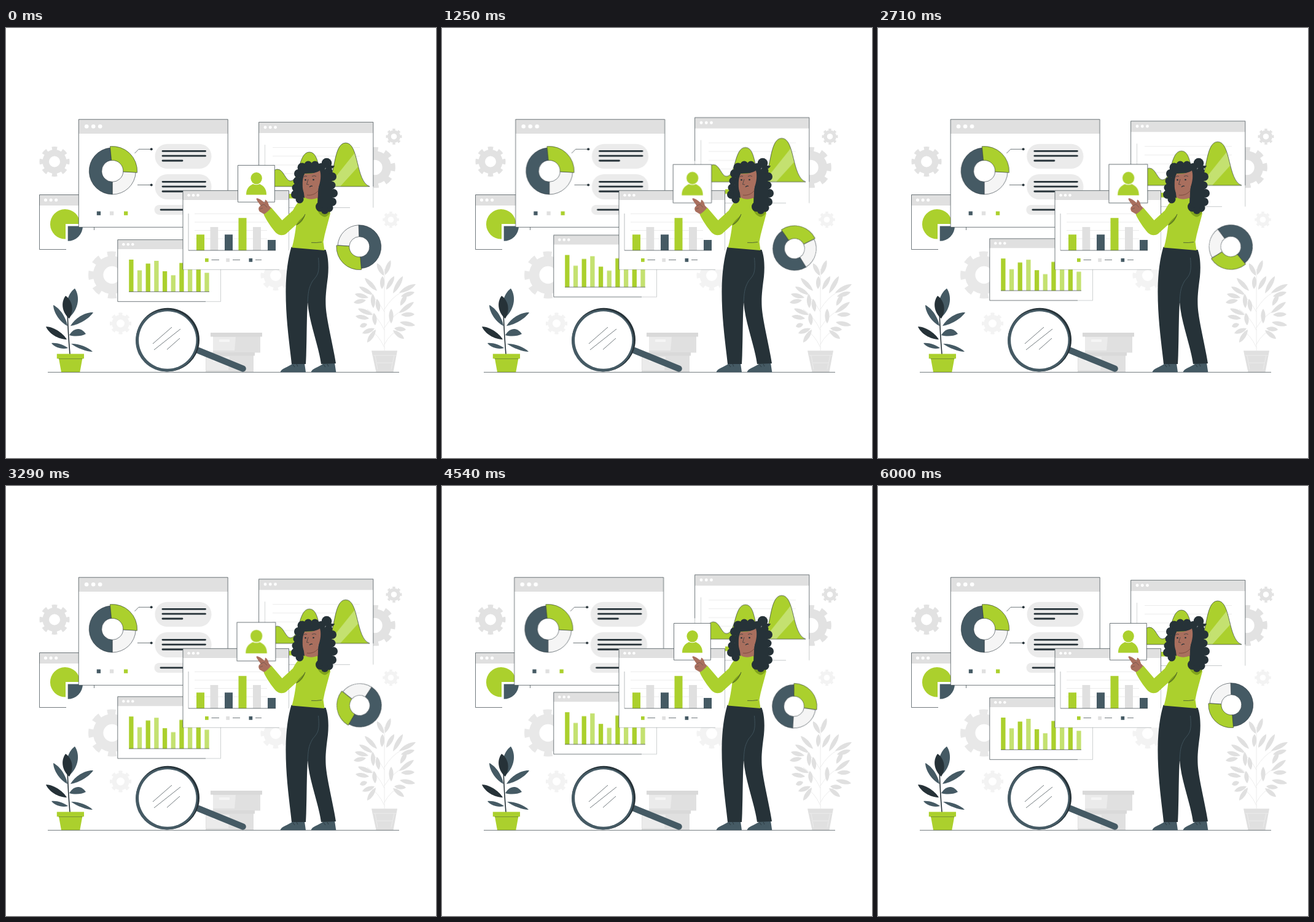
Animation, 700 px wide and 700 px high, one loop 6.04 s. Source, as an HTML page:

```html
<!DOCTYPE html>
<html lang="en">
<head>
<meta charset="utf-8">
<title>Data analysis</title>
<style>
  html, body { margin: 0; width: 100%; height: 100%; overflow: hidden; background: #fff; }
  svg { display: block; width: 100%; height: 100%; }
  .green { fill: #abd02d; } .lime { fill: #c4e170; } .slate { fill: #455a64; }
  .dark { fill: #263238; } .grey { fill: #e0e0e0; } .pale { fill: #ebebeb; }
  .mist { fill: #f5f5f5; } .white { fill: #fff; } .skin { fill: #a96f5e; }
  .line { fill: none; stroke: #263238; stroke-width: .65; }
  .faint { fill: none; stroke: #e8e8e8; stroke-width: .8; }
  .text { fill: none; stroke: #263238; stroke-width: 2.8; stroke-linecap: round; }

  /* six seconds of motion, then a 40 ms hold */
  .shake, .float, .beat, .spin { animation: 6040ms linear -4ms infinite; }
  .shake { animation-name: shake; }
  .float { animation-name: float; animation-timing-function: steps(36); }
  .beat { animation-name: beat; transform-origin: 407.5px 253.5px; }
  .spin { animation-name: spin; animation-timing-function: steps(144); transform-origin: 574.2px 357.5px; }
  @keyframes shake {
    0%, 99.34%, 100% { transform: translateX(0); }
    9.93%, 89.4% { transform: translateX(-1px); }
    19.87%, 79.47% { transform: translateX(2px); }
    29.8%, 49.67%, 69.54% { transform: translateX(-4px); }
    39.74%, 59.6% { transform: translateX(4px); }
  }
  @keyframes float {
    0%, 49.67%, 99.34%, 100% { transform: translateY(0); }
    24.83%, 74.5% { transform: translateY(-9px); }
  }
  @keyframes beat {
    0%, 29.8%, 39.74%, 59.6%, 100% { transform: scale(1); }
    9.93%, 49.67% { transform: scale(1.1); }
  }
  @keyframes spin {
    0% { transform: rotate(0); }
    99.34%, 100% { transform: rotate(720deg); }
  }
</style>
</head>
<body>
<svg viewBox="0 0 700 700">
  <defs>
    <g id="gear" fill="none">
      <circle r="14.3" stroke-width="10.6"/>
      <circle r="21.5" stroke-width="6" pathLength="16" stroke-dasharray="1 1" stroke-dashoffset=".5"/>
    </g>
    <g id="dots" fill="#fff"><circle r="3.3"/><circle cx="11" r="3.3"/><circle cx="22" r="3.3"/></g>
    <path id="hills" d="M424 258C430 236 436 230 442 230C452 230 455 249 463 249C479 249 475 202 494 202C513 202 507 250 521 250C537 250 531 187 553 187C575 187 569 250 592 258Z"/>
    <clipPath id="inHills"><use href="#hills"/></clipPath>
  </defs>

  <g stroke="#e2e2e2">
    <use href="#gear" transform="translate(79 217.5)"/>
    <use href="#gear" transform="translate(631.5 176.7) scale(.53)"/>
    <use href="#gear" transform="translate(600.5 227) scale(1.36)"/>
    <use href="#gear" transform="translate(172.5 402) scale(1.57)" stroke="#e8e8e8"/>
    <g stroke="#f3f3f3">
      <use href="#gear" transform="translate(626.5 312) scale(.54)"/>
      <use href="#gear" transform="translate(186.5 481) scale(.72)"/>
      <use href="#gear" transform="translate(439 403)"/>
    </g>
  </g>

  <!-- storage boxes -->
  <path class="grey" d="M325 533H403V560H325ZM337 502H414V528.5H337Z"/>
  <path fill="#d9d9d9" d="M333 496H417V502.5H333ZM321 528H405V533.5H321Z"/>
  <path class="pale" d="M337 503H374L372 525H337ZM326 535H364L362 557H326Z"/>
  <path class="mist" d="M347 507H364V511H347ZM337 538H354V543H337Z"/>

  <!-- small pie window -->
  <path class="white" d="M54.5 271.5H143.5V360.5H54.5Z"/>
  <path class="grey" d="M54.5 271.5H143.5V289H54.5Z"/>
  <use href="#dots" transform="translate(64.5 280) scale(.78)"/>
  <path class="line" d="M143.5 271.5H54.5V360.5H98M143.5 323V329"/>
  <path class="green" d="M97 319H120.5A24.3 24.3 0 1 0 97 343.5Z"/>
  <path class="slate" d="M100.7 322.5H125A24.3 24.3 0 0 1 100.7 346.8Z"/>

  <!-- bar window -->
  <g class="float">
    <path class="white" d="M181.800 344.700H349.500V445.300H181.800Z"/>
    <path class="grey" d="M181.800 344.700H349.500V360H181.800Z"/>
    <use href="#dots" transform="translate(191.3 352.3) scale(.68)"/>
    <path class="line" d="M349.5 344.7H181.8V445.3H325"/>
    <path class="line" opacity=".35" d="M325 445.3H349.5V345"/>
    <g id="bars"></g>
    <path class="line" d="M200 429.3H331"/>
  </g>

  <!-- area chart window -->
  <g class="float">
    <path class="white" d="M411.6 153.3H597.8V292.5H411.6Z"/>
    <path class="grey" d="M411.6 153.3H597.8V171H411.6Z"/>
    <use href="#dots" transform="translate(422 161.8) scale(.75)"/>
    <path class="line" d="M411.6 224V153.3H597.8V258"/>
    <path class="line" opacity=".4" d="M597.8 258V292.5M411.6 224V292.5H560"/>
    <path class="faint" d="M434 194.5H576M434 208.5H576M434 223H576M434 237H576"/>
    <path class="line" opacity=".3" d="M421.5 190V258"/>
    <use href="#hills" class="green"/>
    <path class="lime" clip-path="url(#inHills)" d="M524 258L568 203L574 225L544 258Z"/>
    <use href="#hills" class="line"/>
    <path class="green" d="M461 270H468V277.5H461Z"/>
  </g>

  <!-- main report window -->
  <g class="shake">
    <path class="white" d="M118.3 148.800H361.200V324.300H118.300Z"/>
    <path class="grey" d="M118.3 148.8H361.2V172H118.3Z"/>
    <use href="#dots" transform="translate(131.2 160.2)"/>
    <path class="line" d="M118.3 148.8H361.2V324.3H118.3Z"/>
    <g id="donut"></g>
    <path class="line" d="M209.5 204L216 197.3H236M214 255.5H236"/>
    <circle class="dark" cx="236.7" cy="197.3" r="2"/><circle class="dark" cx="236.7" cy="255.5" r="2"/>
    <g class="pale">
      <rect x="242.5" y="188.7" width="92" height="40.3" rx="20"/>
      <rect x="242.5" y="238" width="92" height="41" rx="20"/>
      <rect x="241.5" y="288" width="92" height="16" rx="8"/>
    </g>
    <path class="text" d="M255 200.4H324.5M255 208.2H324.5M255 216H287M255 250.3H324.5M255 258.1H324.5M255 266H287M252 295.8H324"/>
    <path class="slate" d="M147.800 298.500h6.300v6.300h-6.300Z"/>
    <path class="grey" d="M169 298.5h6.3v6.3h-6.3Z"/>
    <path class="green" d="M192 298.5h6.3v6.3h-6.3Z"/>
  </g>

  <!-- column chart window -->
  <path class="white" d="M288 264.7H460.5V393.3H288Z"/>
  <path class="grey" d="M288 264.7H460.5V280H288Z"/>
  <use href="#dots" transform="translate(297.5 272.2) scale(.68)"/>
  <path class="line" d="M288 393.3V264.7H460.5V320"/>
  <path class="line" opacity=".4" d="M288 393.3H445M460.5 320V362"/>
  <path class="faint" d="M307 302.5H425M307 316H425M307 329.5H425M307 343H425"/>
  <path class="green" d="M310 336.3H323V362H310ZM378.5 309.3H391.5V362H378.5ZM324 375h5.7v5.7h-5.7Z"/>
  <path class="grey" d="M332.5 324H345.3V362H332.5ZM402 324H415V362H402ZM358.3 375h5.7v5.7h-5.7Z"/>
  <path class="slate" d="M356 336.3H369V362H356ZM426 345H439V362H426ZM395.5 375h5.7v5.7h-5.7Z"/>
  <path class="line" d="M297 362H439M334.5 377.5H347M369 377.5H381M406 377.5H416"/>
  <path class="line" opacity=".5" d="M297 302V362"/>

  <!-- profile card -->
  <g class="beat">
    <path class="white" d="M377.5 223.5H437.3V283.3H377.5Z"/>
    <path class="line" d="M377.5 223.5H437.3V283.3H377.5Z"/>
    <ellipse class="green" cx="407.6" cy="244.6" rx="9.2" ry="9.6"/>
    <path class="green" d="M391 271.5C391 261 396 257 402 254Q407.5 256.5 413 254C419 257 424 261 424 271.5Z"/>
  </g>

  <g class="spin" id="wheel"></g>

  <!-- plants -->
  <path class="faint" d="M616 525V392M616 520Q606 498 590 490M616 515Q626 496 645 488M616 492Q606 470 588 458M616 488Q628 468 648 458M616 462Q604 440 588 430M616 458Q628 438 644 430"/>
  <g class="grey" id="bush"></g>
  <path class="grey" d="M595 525.300H637L630.500 560.300H602.500Z"/>
  <path fill="none" stroke="#eee" stroke-width=".8" d="M598 533H635M601 533L605 556M632 533L627 556M604 545H629"/>
  <path d="M104 531Q101 495 100 462" fill="none" stroke="#263238" stroke-width="1.6"/>
  <g id="ficus"></g>
  <path class="green" d="M82.8 530.5H127V538.3H124.3L120.3 560.3H90L86 538.3H82.8Z"/>
  <path class="line" opacity=".6" d="M85.5 538.5H124.5"/>

  <path class="line" d="M68 560.4H640"/>

  <!-- magnifier -->
  <path d="M312 524.5L385.5 554.5" stroke="#455a64" stroke-width="10.5" stroke-linecap="round"/>
  <circle class="dark" cx="263.3" cy="507.5" r="51.7"/>
  <circle class="slate" cx="261.6" cy="508.8" r="50.6"/>
  <circle class="white" cx="262.8" cy="508" r="46.7"/>
  <path class="line" d="M239 514L270 487M241 524L284 490M262 523.5L283 505"/>

  <!-- analyst -->
  <path class="slate" d="M446.500 560.300C448 554 459 552.500 467 546L486 546L488 560.300ZM496.500 560.300C498 554 509 552.500 517 546L535 545L537.300 560.300Z"/>
  <path d="M467 548l3 4M473 547l2 4M517 548l3 4M523 547l2 4" stroke="#263238" stroke-width=".8"/>
  <path class="dark" d="M464.5 356.5L520.5 361C525 373 525.500 390 524 405C521 428 519 444 521.500 463C524 484 532 515 537 546L513 547C508 513 494 482 491 446C489 478 490 512 488 547H465C461 510 455 470 455.500 425C456 398 459 375 464.500 356.500Z"/>
  <path d="M508.500 374C511 400 507 402 499 412C492 424 492 432 491 446" fill="none" stroke="#455a64" stroke-width=".8"/>
  <path class="skin" d="M408.500 277C413 278 417 281 421 284.500L422 279.500C425 280 427 285 428 289L433 294L422 304L413 299C410 295 411 291 414.500 289.500C412 285 408 281 407.500 278Z"/>
  <path class="line" opacity=".5" d="M414 289.5L420 287L425 292M413 295L418 293"/>
  <path class="skin" d="M483 262H509V284H483Z"/>
  <path class="green" d="M486 275C479 278 473 286 467 297L449.500 313L432 292.500C428 297 424 301 419.500 303.500C424 313 432 325 439 333C444 338 451 338.500 456 335L472.500 320C471 332 469 345 465.500 357.500L518.500 362L516.500 348C519 333 524 318 528 302C522 287 512 280 507 277Z"/>
  <path fill="#80a31c" d="M472.500 321C480 319 485 312 487 304C481 310 475 314 472.500 321ZM504 288C506 300 514 308 520 307.500C525 305 528 301 528 298Z"/>
  <path class="line" d="M497 349.3Q505 350 514 348.5M472.5 321Q483 314 487 303"/>
  <g class="dark" id="hair"></g>
  <path class="skin" d="M487 237C496 238 505 236 511 232C513.500 240 512 251 508.500 260L507.500 276C500 280 492 279 486 276L490 272C485 271 482.500 264 482.800 255C482.800 248 483.500 240 487 237Z"/>
  <path d="M490 272C498 273 504 270 508 265" fill="none" stroke="#7d4b3f" stroke-width="1"/>
  <circle class="dark" cx="487.5" cy="247.3" r="1.3"/><circle class="dark" cx="500.5" cy="247" r="1.3"/>
  <path class="line" d="M484.500 242.500Q487 240 490 241.500M498 241.500Q502 239.500 505 241.500M492 246L489.500 254.500L493 255"/>
  <path d="M494 259Q496 256.500 499 257.500" fill="none" stroke="#263238" stroke-width="1.2"/>
</svg>
<script>
  const put = (id, html) => { document.getElementById(id).innerHTML = html; };

  function sector(cx, cy, r0, r1, a0, a1, attrs) {
    const at = (r, a) => `${cx + r * Math.cos(a * Math.PI / 180)} ${cy + r * Math.sin(a * Math.PI / 180)}`;
    const big = a1 - a0 > 180 ? 1 : 0;
    return `<path ${attrs} stroke="#263238" stroke-width=".6" d="M${at(r1, a0)}A${r1} ${r1} 0 ${big} 1 ${at(r1, a1)}
      L${at(r0, a1)}A${r0} ${r0} 0 ${big} 0 ${at(r0, a0)}Z"/>`;
  }

  // base, tip, then how far each side bulges
  function leaf([x0, y0, x1, y1, left, right = left], attrs = '') {
    const dx = x1 - x0, dy = y1 - y0, len = Math.hypot(dx, dy);
    const side = (k, w) => `${x0 + dx * k - dy / len * w} ${y0 + dy * k + dx / len * w}`;
    const l = left * 4 / 3, r = -right * 4 / 3;
    return `<path ${attrs} d="M${x0} ${y0}C${side(.3, l)} ${side(.75, l)} ${x1} ${y1}C${side(.75, r)} ${side(.3, r)} ${x0} ${y0}"/>`;
  }

  put('donut',
    sector(173.3, 232.9, 17.5, 38, 90, 265, 'class="slate"') +
    sector(173.3, 232.9, 17.5, 38, 3, 90, 'class="mist"') +
    sector(173.3, 232.9, 17.5, 40.3, 264.5, 363.5, 'class="green"'));

  put('wheel',
    sector(575.3, 356.2, 16.5, 35.4, -92, 86, 'class="slate"') +
    sector(575.3, 356.2, 16.5, 35.4, 184, 268, 'class="mist"') +
    sector(575.3, 356.2, 16.5, 37.4, 85, 183.5, 'class="green"'));

  put('bars', [377, 394.5, 383.5, 379, 396, 402.5, 382.5, 390, 388, 398.5].map((y, i) =>
    `<rect class="${i % 2 ? 'lime' : 'green'}" x="${200.2 + i * 13.68}" y="${y}" width="7.3" height="${429.3 - y}"/>`).join(''));

  put('ficus', [
    [104, 470, 112, 424, 8.5, 8.5, 'slate'], [103, 473, 97, 436, 7.5, 7.5, 'dark'],
    [100, 485, 77, 451, 4.5, 5, 'slate'], [105, 485, 142, 463, 4, 5.5, 'slate'],
    [99, 507, 65, 486, 4.5, 5.5, 'dark'], [103, 500, 130, 498, 2.5, 9, 'slate'],
    [101, 521, 74, 513, 2.5, 4, 'slate'], [106, 514, 141, 527, 2.5, 3.5, 'slate']
  ].map(l => leaf(l, `class="${l[6]}"`)).join(''));

  const sprigs = `615 403 604 383|617 402 626 378|612 425 613 404|619 426 632 404
    604 428 584 407|597 434 575 421|590 439 568 433|586 443 566 447|598 456 597 433|607 462 604 441
    597 467 573 457|591 473 569 469|588 482 576 486|601 484 599 464|600 489 580 497|602 491 588 512
    630 432 646 404|640 431 667 417|643 437 665 430|627 481 627 457|642 452 652 434|640 464 664 446
    643 467 665 466|641 479 666 484|632 489 651 491|630 492 648 506`;
  put('bush', sprigs.split(/[|\n]/).map(s => leaf([...s.trim().split(' ').map(Number), 3.6])).join(''));

  const curls = [
    [522, 220, 8.3], [482, 227, 7.5], [492, 223, 6.5], [503, 223, 6.5], [513, 227, 7],
    [476, 237, 7], [474, 249, 6.5], [472, 260, 6.5], [471, 271, 7], [478, 279, 6.5],
    [525, 233, 6.5], [531, 242, 7], [530, 256, 6.5], [533, 269, 7], [531, 283, 7],
    [526, 293, 6.5], [512, 291, 8], [519, 297, 6]
  ];
  put('hair', curls.map(([x, y, r]) => `<circle cx="${x}" cy="${y}" r="${r}"/>`).join('') +
    '<path d="M480 226L514 226L530 240L532 285L520 296L507 288L508 262L512 236L486 237L484 262L486 277L474 272Z"/>' +
    '<path d="M524 222Q530 225 535 224Q534 229 526 230Z"/>');
</script>
</body>
</html>
```
